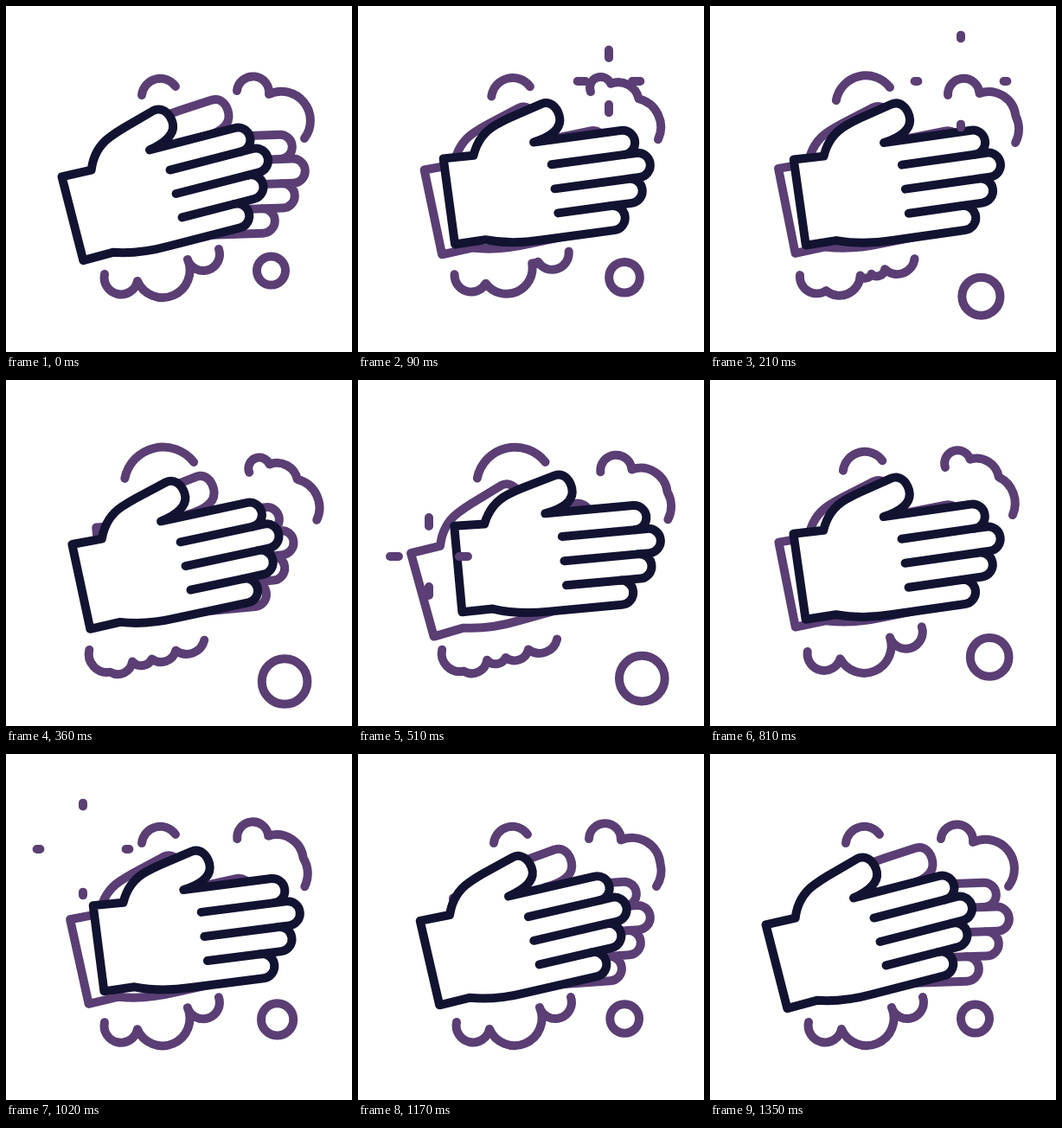
Animation of 400x400 px, one loop 1380 ms. Source, as an HTML page:

```html
<!DOCTYPE html>
<html lang="en">
<head>
<meta charset="utf-8">
<title>Washing hands</title>
<style>
  html, body { margin: 0; width: 100%; height: 100%; overflow: hidden; background: #fff; }
  svg { display: block; width: 100%; height: 100%; }
  svg * { fill: none; stroke: #5a3e74; stroke-width: 10; stroke-linecap: round; stroke-linejoin: round; }
  .hand { fill: #fff; }
  #front path { stroke: #121331; }
</style>
</head>
<body>
<svg viewBox="0 0 400 400">
  <path id="arc"/>
  <path id="cloud"/>
  <path id="suds"/>
  <circle id="bubble"/>
  <g id="back"></g>
  <g id="front"></g>
  <path id="sparks"/>
</svg>
<script>
const STEP = 30, LOOP = 1380, LAST = 45;
const $ = id => document.getElementById(id);
const set = (id, attrs) => {
  for (const k in attrs) $(id).setAttribute(k, attrs[k]);
};
const lerp = (a, b, p) => a + (b - a) * p;
const mix = (a, b, p) => a.map((v, i) => lerp(v, b[i], p));
const smooth = (from, to, t) => {
  const u = Math.min(1, Math.max(0, (t - from) / (to - from)));
  return u * u * (3 - 2 * u);
};
// Rises from zero until `top`, falls back between `hold` and `end`.
const bump = (t, top, hold, end) => smooth(0, top, t) * (1 - smooth(hold, end, t));
const easeOut = (u, power) => 1 - (1 - u) ** power;
const arcTo = (r, sweep, [x, y]) => `A${r} ${r} 0 0 ${sweep} ${x} ${y}`;

// Hand with its origin at the cuff corner; trim shortens the fingers.
function drawHand(id, trim) {
  const pitch = 28.3, top = -4.7, x = 208 - trim, tip = `a14.15 14.15 0 0 1 0 ${pitch}`;
  const body = `M0 0L35 1C41.5 -15.5 52.5 -25.5 65.5 -30.6Q74 -34 83 -36.7L121 -47.5
    C131 -50 138 -42 139.5 -31C141 -18 130 -9 106 ${top}
    H${x}${tip}h14${tip}h-13${tip}h-24${tip}H100C75 109 52 105 35.5 99.5L0 100Z`;
  const gaps = [0, 0, -23].map((dx, i) => `M123 ${top + pitch * (i + 1)}H${x + dx}`).join('');
  $(id).innerHTML = `<path class="hand" d="${body}"/><path d="${gaps}"/>`;
}
drawHand('front', 0);
drawHand('back', 10.5);

// Poses at both ends of a rub: x, y, angle.
const rubs = {
  front: [[64.5, 197.3, -14.4], [114.5, 166.7, -4.6]],
  back: [[119, 160.3, -2], [57, 203, -16.4]]
};
function drawHands(t) {
  const p = (1 - Math.cos(6 * Math.PI * easeOut(t / LAST, 1.58))) / 2;
  for (const id in rubs) {
    const [x, y, angle] = mix(...rubs[id], p);
    set(id, { transform: `translate(${x} ${y}) rotate(${angle})` });
  }
}

const quad = (a, b, c, p) => mix(mix(a, b, p), mix(b, c, p), p);

// Three puffs roll along the cloud: one grows in, one swells, one leaves.
function drawCloud(t) {
  const f = 3 * easeOut(t / LAST, 2) % 1, d = bump(t, 13, 13, 36);
  const start = [267, 98], joint = [304, 102], last = [352, 129], end = [345, 153];
  const first = quad(start, [304.5, 77], joint, f);
  const second = quad(joint, [328, 102], last, f);
  set('cloud', {
    d: `M${start}` + arcTo(18 * f, 1, first) + arcTo(lerp(18, 33.7, f), 1, second) + arcTo(33.7, 1, end),
    transform: `translate(${14.5 * d} ${9 * d})`
  });
}

// Lower foam: three large puffs split into five small ones and merge again.
const merged = [[114, 310], [152, 318], [210, 293], [210, 293], [210, 293], [246, 281]];
const split = [[99, 300], [123, 326], [148, 314], [171, 311], [199, 301], [232, 289]];
function drawSuds(t) {
  const p = bump(t, 13, 15, 28), d = bump(t, 13, 13, 36);
  const joints = merged.map((m, i) => mix(m, split[i], p));
  let path = `M${joints[0]}`;
  joints.slice(1).forEach((to, i) => {
    const [x, y] = joints[i], chord = Math.hypot(to[0] - x, to[1] - y);
    if (chord > 1) path += arcTo(chord * (0.5 + 0.1 * p), 0, to);
  });
  set('suds', { d: path, transform: `translate(${-3 * d} ${12 * d})` });
}

function drawBubbles(t) {
  const g = bump(t, 13, 15, 31);
  set('arc', { d: `M${157 - 20 * g} ${103 + 11 * g}` + arcTo(21.5 + 24 * g, 1, [196 + 21.5 * g, 93 + 2 * g]) });
  set('bubble', {
    cx: 306.5 + 22.5 * bump(t, 19, 19, 43),
    cy: 306 + 42.5 * bump(t, 11, 13, 36),
    r: 16.5 + 10 * bump(t, 13, 15, 42)
  });
}

// Centre and starting step of each burst.
const bursts = [[290, 87, 1], [82, 204, 13.8], [89, 110, 28]];
function drawSparks(t) {
  let d = '';
  for (const [x, y, start] of bursts) {
    const u = (t - start) / 8;
    if (u <= 0 || u >= 1) continue;
    const outer = 12 + 42 * easeOut(u, 3), inner = 12 + 43 * easeOut(u, 1.5);
    for (const [i, j] of [[1, 0], [-1, 0], [0, 1], [0, -1]])
      d += `M${x + i * inner} ${y + j * inner}L${x + i * outer} ${y + j * outer}`;
  }
  set('sparks', { d });
}

const begin = performance.now();
function tick() {
  const ms = Math.max(0, performance.now() - begin) % LOOP;
  const t = Math.min(LAST, Math.floor(ms / STEP));
  for (const part of [drawHands, drawCloud, drawSuds, drawBubbles, drawSparks]) part(t);
  requestAnimationFrame(tick);
}
tick();
</script>
</body>
</html>
```
